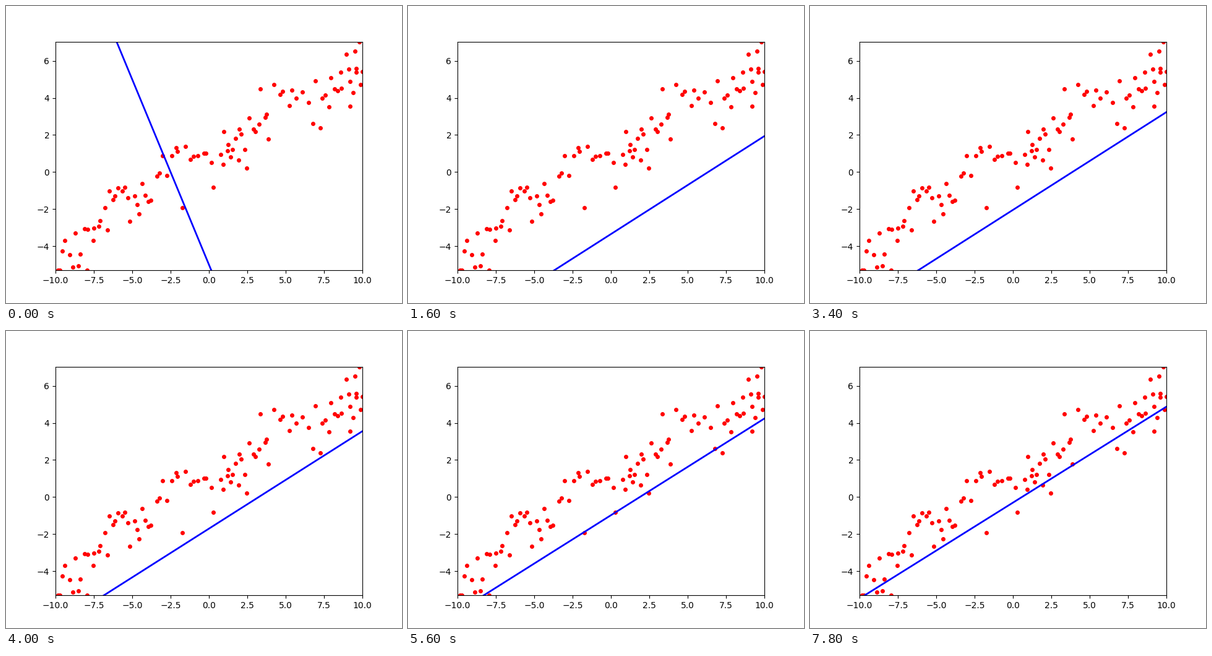
A matplotlib script for the animation above (8 s loop, 640 by 480 pixels).

```python
import numpy as np
import matplotlib.pyplot as plt
from matplotlib.animation import FuncAnimation

STEPS = 40
RATE = 0.02
COUNT = 100
XLIM = (-10, 10)
YLIM = (-5.305, 7.04)

# Best fit, and the first two moments of x that shape the descent.
W_FIT, B_FIT = 0.511, 0.899
X_MEAN, X_SQ = 0.207, 36.88

# Key points along the cloud, a tenth of the samples between neighbours.
KEY_X = [-9.95, -8.1, -6.15, -4.3, -1.9, 0.8, 2.25, 4.05, 7.1, 9.0, 10]
KEY_Y = [-5.0, -3.6, -2.05, -0.8, 0.15, 1.05, 2.25, 3.2, 4.05, 5.15, 5.95]


def sample_cloud(seed=0):
    """Scatter samples evenly by rank around the key points."""
    rng = np.random.default_rng(seed)
    rank = (np.arange(COUNT) + rng.random(COUNT)) * (len(KEY_X) - 1) / COUNT
    keys = np.arange(len(KEY_X))
    x = np.interp(rank, keys, KEY_X)
    y = np.interp(rank, keys, KEY_Y) + rng.normal(0, 0.9, COUNT)
    return x, np.clip(y, *YLIM)


def descend(w, b):
    """Gradient descent on the squared error; returns every step."""
    path = []
    for _ in range(STEPS):
        path.append((w, b))
        dw, db = w - W_FIT, b - B_FIT
        w -= 2 * RATE * (dw * X_SQ + db * X_MEAN)
        b -= 2 * RATE * (dw * X_MEAN + db)
    return path


path = descend(-2.0, -5.0)
ends = np.array(XLIM)

fig, ax = plt.subplots(figsize=(6.4, 4.8), dpi=100)
ax.set(xlim=XLIM, ylim=YLIM)
ax.plot(*sample_cloud(), 'ro', markersize=4)
line, = ax.plot([], [], 'b-', linewidth=2)


def update(i):
    w, b = path[i]
    line.set_data(ends, w * ends + b)
    return line,


anim = FuncAnimation(fig, update, frames=STEPS, interval=200, repeat=True,
                     repeat_delay=0)
plt.show()
```
